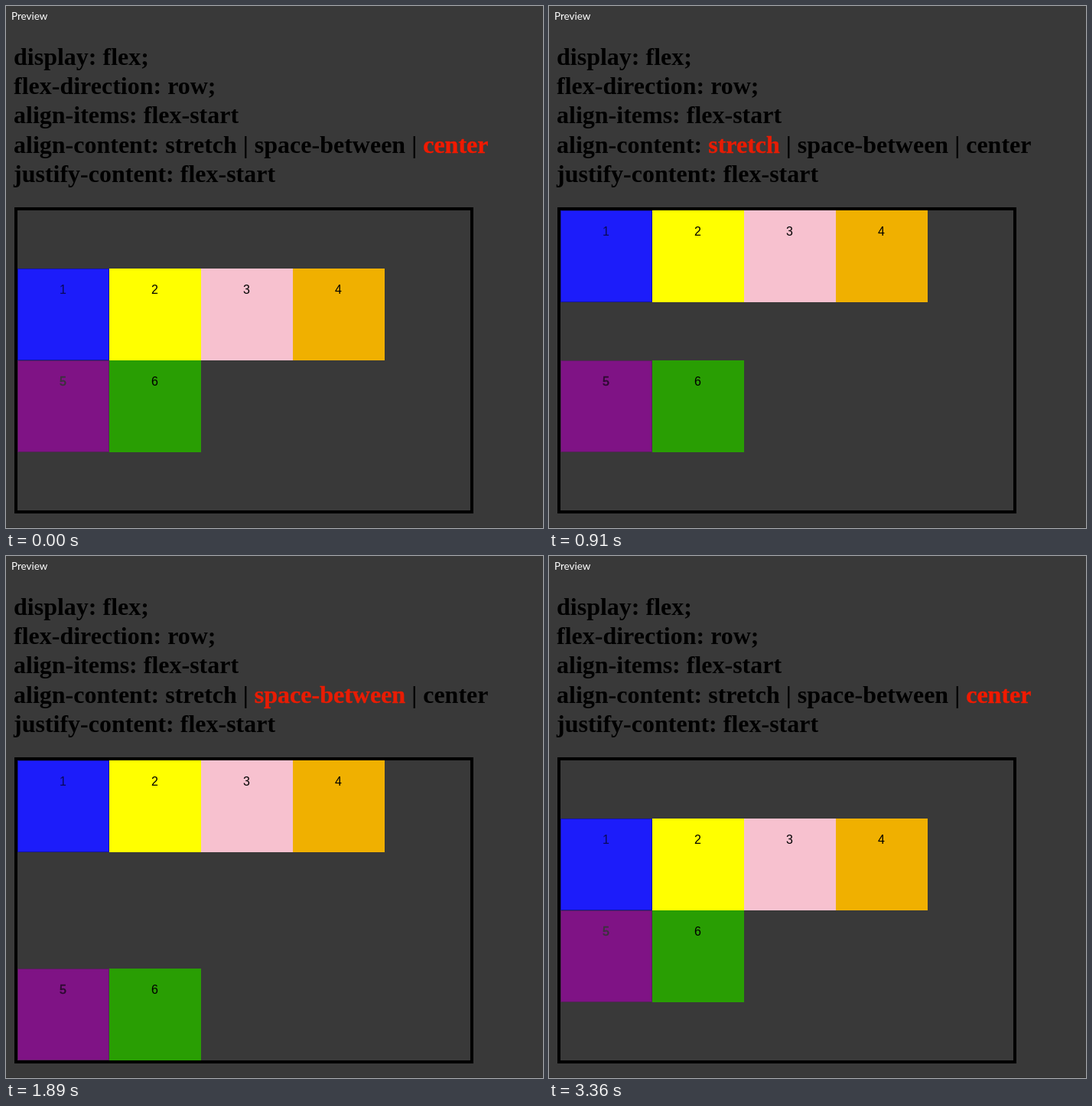
These frames come from a looping animation (702 px wide and 682 px high, 3.43 s). An HTML page:

```html
<!DOCTYPE html>
<html lang="en">
<head>
<meta charset="utf-8">
<title>align-content preview</title>
<style>
  html, body { margin: 0; width: 100%; height: 100%; overflow: hidden; background: #393939; }
  svg { display: block; width: 702px; height: 682px; }
  .title { font: 13.5px Lato, sans-serif; fill: #fff; }
  .code { font: bold 32px "Liberation Serif", Times, serif; }
  .num { font: 16px "Liberation Sans", Arial, sans-serif; text-anchor: middle; }
  .edge { fill: none; }

  /* every state switches hard: center, stretch, space-between, center */
  .anim { animation: 3430ms step-end infinite; }
  .stretch { animation-name: stretch; }
  .between { animation-name: between; }
  .center { animation-name: center; }
  .row1 { animation-name: row1; }
  .row2 { animation-name: row2; }
  .five { animation-name: five; }

  @keyframes stretch {
    0%, 40.8%, 100% { fill: #000; stroke: none; }
    10.2% { fill: #e81c04; stroke: #e81c04; }
  }
  @keyframes between {
    0%, 71.4%, 100% { fill: #000; stroke: none; }
    40.8% { fill: #e81c04; stroke: #e81c04; }
  }
  @keyframes center {
    0%, 71.4%, 100% { fill: #f01a00; stroke: #f01a00; }
    10.2% { fill: #000; stroke: none; }
  }
  @keyframes row1 {
    0%, 71.4%, 100% { transform: translateY(343px); }
    10.2% { transform: translateY(267px); }
  }
  @keyframes row2 {
    0%, 10.2%, 71.4%, 100% { transform: translateY(463px); }
    40.8% { transform: translateY(539px); }
  }
  @keyframes five {
    0%, 71.4%, 100% { fill: #3b333c; stroke: #3b333c; }
    10.2% { fill: #2c0a30; stroke: #2c0a30; }
  }
</style>
</head>
<body>
<svg viewBox="0 0 702 682">
  <rect width="702" height="682" fill="#393939"/>
  <rect y="681" width="702" height="1" fill="#303030"/>
  <text class="title" x="7" y="18">Preview</text>

  <g class="code">
    <text x="10" y="77">display: flex;</text>
    <text x="10" y="115">flex-direction: row;</text>
    <text x="10" y="153">align-items: flex-start</text>
    <text x="10" y="192" stroke-width=".4">align-content: <tspan class="anim stretch">stretch</tspan> | <tspan class="anim between">space-between</tspan> | <tspan class="anim center">center</tspan></text>
    <text x="10" y="230">justify-content: flex-start</text>
  </g>

  <rect x="13" y="265" width="596" height="396" fill="none" stroke="#000" stroke-width="4"/>

  <g class="anim row1">
    <rect x="15" width="120" height="120" fill="#1c1cfa"/>
    <rect class="edge" x="15.5" y=".5" width="119" height="119" stroke="#1414a8"/>
    <rect x="135" width="120" height="120" fill="#ff0"/>
    <rect x="255" width="120" height="120" fill="#f7c1cf"/>
    <rect x="375" width="120" height="120" fill="#f0b000"/>
    <g class="num">
      <text x="74.5" y="33" fill="#0a0a58">1</text>
      <text x="194.5" y="33">2</text>
      <text x="314.5" y="33">3</text>
      <text x="434.5" y="33">4</text>
    </g>
  </g>

  <g class="anim row2">
    <rect x="15" width="120" height="120" fill="#7f1385"/>
    <rect class="edge" x="15.5" y=".5" width="119" height="119" stroke="#58205c"/>
    <rect x="135" width="120" height="120" fill="#299e03"/>
    <g class="num">
      <text class="anim five" x="74.5" y="33" stroke-width=".6">5</text>
      <text x="194.5" y="33">6</text>
    </g>
  </g>
</svg>
</body>
</html>
```
